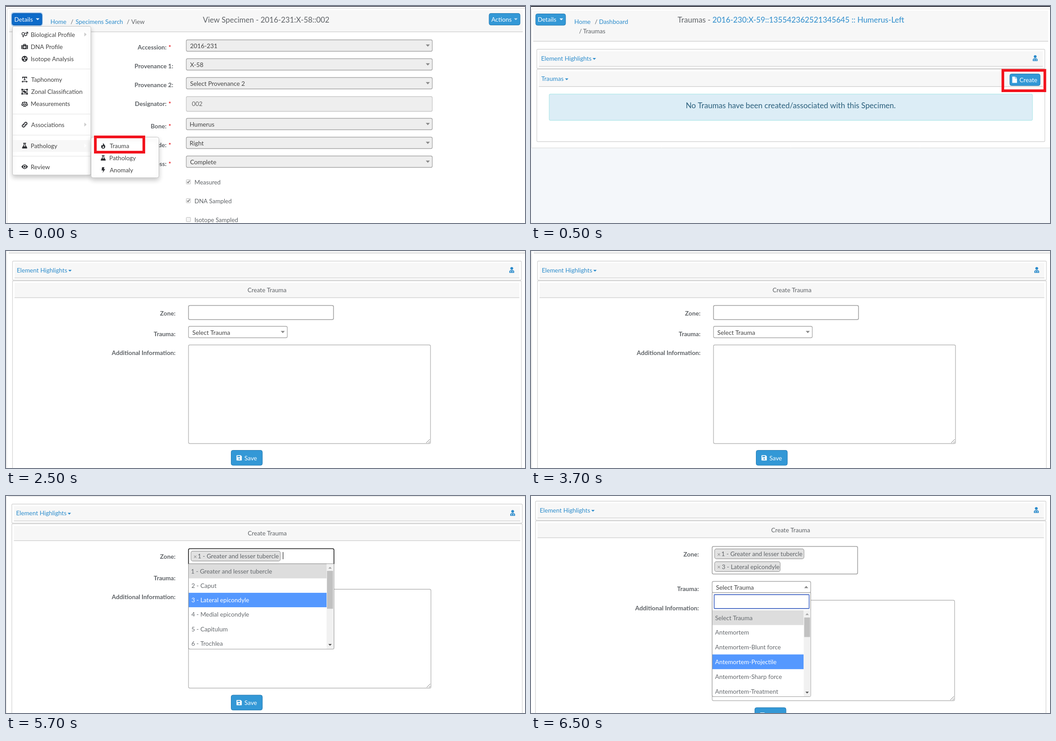
Write an HTML page with a canvas that moves like this. It is 1156 px wide and 484 px high and loops after 8 s.

```html
<!DOCTYPE html>
<html lang="en">
<head>
<meta charset="utf-8">
<title>Specimen trauma walkthrough</title>
<style>
html, body { margin: 0; width: 100%; height: 100%; overflow: hidden; background: #fff; }
canvas { display: block; width: 1156px; height: 484px; }
</style>
</head>
<body>
<canvas id="stage" width="1156" height="484"></canvas>
<script>
const ctx = document.getElementById('stage').getContext('2d');
const W = 1156, H = 484;
const LINK = '#2c8ccc', BTN = '#3398d6', BTN_EDGE = '#2579b0', GREY = '#5f6367', INK = '#444',
      LINE = '#d3d3d3', HEAD = '#f7f7f7', RED = '#f2131d', PICK = '#5498ff';

const ring = (x, y, r) =>
  `M${x - r} ${y}a${r} ${r} 0 1 0 ${2 * r} 0a${r} ${r} 0 1 0 ${-2 * r} 0z`;

// Icons on a 16 unit square: [filled path, stroked path]
const ICONS = {
  gender: ['', ring(4.5, 6.2, 3.2) + ring(10.4, 7.6, 3.2) + 'M4.5 9.4v5.4M2.4 12.4h4.2M12.8 5.3L15.6 2.4M12.2 2.2h3.6v3.6'],
  kit: ['M2 4h12q2 0 2 1.6v6.8q0 1.6-2 1.6H2q-2 0-2-1.6V5.6Q0 4 2 4zM2.6 4h.9v10h-.9zM12.5 4h.9v10h-.9z' +
    'M7 6h2v2h2v2H9v2H7v-2H5V8h2zM4.6 4V2.5q0-1 1-1h4.8q1 0 1 1V4H10V3H6v1z'],
  atom: [ring(8, 8, 7.2) + ring(8, 8, 1.1) + 'M6 8H3a5 5 0 0 1 2.5-4.33L7 6.27zM10 8h3a5 5 0 0 0-2.5-4.33L9 6.27z' +
    'M9 9.73l1.5 2.6a5 5 0 0 1-5 0L7 9.73z'],
  width: ['M2 1h12v4h-1.6L12 3H9v5h1.5v1.3h-5V8H7V3H4l-.4 2H2zM4 10.2v1.7h8v-1.7l3.6 2.7-3.6 2.6v-1.8H4v1.8L.4 12.9z'],
  group: ['M0 1h4v3.6H0zM12 1h4v3.6h-4zM0 11.4h4V15H0zM12 11.4h4V15h-4zM4 5h5v2h3v4.5H7V9.5H4z', 'M2 2.6h12v10.8H2z'],
  scale: ['M0 10h6.4a3.2 2.6 0 0 1-6.4 0zM9.6 10H16a3.2 2.6 0 0 1-6.4 0z',
    'M8 2v12M4 14.4h8M2.6 4h10.8M3.2 4.2L.8 10M3.2 4.2L5.6 10M12.8 4.2L10.4 10M12.8 4.2L15.2 10'],
  link: ['', 'M6.6 9.4a3 3 0 0 1 0-4.2l2.4-2.4a3 3 0 0 1 4.2 4.2l-1.6 1.6M9.4 6.6a3 3 0 0 1 0 4.2l-2.4 2.4a3 3 0 0 1-4.2-4.2l1.6-1.6'],
  flask: ['M4.6 1h6.8v1.8h-1v3.4l3.8 6.3q.9 2.2-1.2 2.2H3q-2.1 0-1.2-2.2l3.8-6.3V2.8h-1zM7.3 2.8h1.4v3.8l1.6 2.7H5.7l1.6-2.7z'],
  eye: ['M0 8Q8-3 16 8 8 19 0 8z' + ring(8, 8, 3.7) + ring(8, 8, 2.3)],
  fire: ['M8 .6C8.6 4 13.2 6 13.2 10.2a5.2 5.2 0 0 1-10.4 0C2.8 8 4 7 4.6 5.4c.4 1.6 1.2 1.8 2 1.8C8 5 7 3 8 .6z' +
    'M8.4 8.6c2.2 2 2.4 4.8-.2 5-2.6 0-2.4-2.8.2-5z'],
  bolt: ['M5 .8h6L9.6 5.6H13L6.4 15.6 8 9H4z'],
  doctor: [ring(8, 4, 3.7) + 'M1.6 15v-2.4Q1.6 8.8 5.4 8.8h5.2q3.8 0 3.8 3.8V15q0 .7-.8.7H2.4q-.8 0-.8-.7z' +
    ring(5.4, 12.5, 1.4) + ring(10.6, 12.5, 1.4)],
  file: ['M2 0h7v4.5h5V16H2zM10 0l4 3.6h-4z'],
  disk: ['M1 2.2Q1 1 2.2 1H12l3 3v9.8q0 1.2-1.2 1.2H2.2Q1 15 1 13.8zM3.4 3h7.2v3.4H3.4z' + ring(8, 10.8, 2)]
};

function icon(name, cx, cy, size, color) {
  const [fill, line] = ICONS[name];
  ctx.save();
  ctx.translate(cx - size / 2, cy - size / 2);
  ctx.scale(size / 16, size / 16);
  ctx.fillStyle = ctx.strokeStyle = color;
  ctx.lineWidth = name === 'link' ? 2.1 : 1.5;
  if (fill) ctx.fill(new Path2D(fill), 'evenodd');
  if (line) ctx.stroke(new Path2D(line));
  ctx.restore();
}

// Places the visible edge of the text at x, with the capitals centred on y
function text(str, x, y, color = GREY, size = 13.6, align = 'left', weight = 400) {
  ctx.font = `${weight} ${size}px Lato, "Open Sans", sans-serif`;
  ctx.fillStyle = color;
  const m = ctx.measureText(str);
  const l = -m.actualBoundingBoxLeft, r = m.actualBoundingBoxRight;
  const dx = align === 'left' ? l : align === 'right' ? r : (l + r) / 2;
  ctx.fillText(str, x - dx, y + size * 0.36);
}

const label = (str, x, y) => text(str, x, y, GREY, 13.7, 'right', 700);

function rect(x, y, r, b, color) {
  ctx.fillStyle = color;
  ctx.fillRect(x, y, r - x, b - y);
}

function box(x, y, r, b, fill, edge, radius = 3, lw = 1) {
  ctx.beginPath();
  ctx.roundRect(x + .5, y + .5, r - x - 1, b - y - 1, radius);
  if (fill) { ctx.fillStyle = fill; ctx.fill(); }
  ctx.strokeStyle = edge;
  ctx.lineWidth = lw;
  ctx.stroke();
}

function tri(cx, cy, w, h, color) {
  ctx.fillStyle = color;
  ctx.beginPath();
  ctx.moveTo(cx - w / 2, cy - h / 2);
  ctx.lineTo(cx + w / 2, cy - h / 2);
  ctx.lineTo(cx, cy + h / 2);
  ctx.fill();
}

function marker(x, y, r, b) {
  ctx.strokeStyle = RED;
  ctx.lineWidth = 6;
  ctx.strokeRect(x + 3, y + 3, r - x - 6, b - y - 6);
}

function shadowed(draw) {
  ctx.save();
  ctx.shadowColor = 'rgba(0,0,0,.22)';
  ctx.shadowBlur = 11;
  ctx.shadowOffsetY = 5;
  draw();
  ctx.restore();
}

function select(x, y, r, b, str, fill = '#fff', up = false) {
  box(x, y, r, b, fill, '#a4a4a4', 3, 1.3);
  text(str, x + 9, (y + b) / 2 + 1.2, INK, 13.75);
  tri(r - 10.5, (y + b) / 2, 9, up ? -5 : 5, '#888');
}

function barHead(x, y, r, b) {
  rect(x, y, r, b, HEAD);
  rect(x, b, r, b + 1.2, '#c8c8c8');
}

function specimenView() {
  rect(0, 0, W, 1.5, '#2b2d38');
  box(2, 5, 1158, 600, '#fff', '#d8d8d8');
  barHead(7, 9, 1151, 57);

  text('Home', 100, 35, LINK, 13.4);
  text('/', 144, 35, GREY, 13.4);
  text('Specimens Search', 155, 35, LINK, 13.4);
  text('/', 269, 35, GREY, 13.4);
  text('View', 279, 35, GREY, 13.4);
  text('View Specimen - 2016-231:X-58::002', 579, 30.5, GREY, 16.9, 'center');

  box(11, 14, 82, 45, '#a9cdf0', '#a9cdf0', 5);
  box(13, 16, 80.5, 43, '#0d6bc9', '#0a55a5', 4);
  text('Details', 19.5, 30, '#fff', 13.6);
  tri(70.5, 29.5, 8, 4, '#fff');
  box(1075.5, 16, 1145.5, 43, BTN, BTN_EDGE, 4);
  text('Actions', 1081, 30, '#fff', 13.7);
  tri(1135.5, 29.5, 8, 4, '#c6e2f4');

  const fields = [
    ['Accession:', 92, 75, '2016-231', 1], ['Provenance 1:', 134, 117, 'X-58', 0],
    ['Provenance 2:', 176.5, 159, 'Select Provenance 2', 0], ['Bone:', 268, 250, 'Humerus', 1],
    ['Side:', 310, 292, 'Right', 1], ['Completeness:', 352, 334, 'Complete', 1]
  ];
  const named = (str, y, need) => {
    label(str, need ? 357 : 372, y);
    if (need) text('*', 362, y, '#e8161e', 13.5, 'left', 700);
  };
  for (const [name, y, top, value, need] of fields) {
    named(name, y, need);
    select(401, top, 950, top + 26.5, value, '#eee');
  }
  named('Designator:', 218, 1);
  box(401, 201.5, 950, 235.5, '#eee', '#c6c6c6', 3, 1.3);
  text('002', 414, 218.5, '#666');

  ['Measured', 'DNA Sampled', 'Isotope Sampled'].forEach((name, i) => {
    const y = 387 + i * 42;
    box(401, y, 411.5, y + 10.5, '#f5f5f5', '#bbb', 1);
    if (i < 2) {
      ctx.strokeStyle = '#777';
      ctx.lineWidth = 1.7;
      ctx.stroke(new Path2D(`M403.5 ${y + 5.2}l2 2.3 3.7-5`));
    }
    text(name, 420.7, y + 6.5, GREY, 13.4);
  });

  shadowed(() => box(14, 45, 189.5, 377.5, '#fff', '#c4c4c4', 3));
  rect(15, 299, 189, 325.5, HEAD);
  for (const y of [140, 240.5, 287.5, 334.5]) rect(15, y, 189, y + 1, '#e2e2e2');
  const items = [
    ['Biological Profile', 'gender', 64], ['DNA Profile', 'kit', 91], ['Isotope Analysis', 'atom', 118],
    ['Taphonomy', 'width', 164.5], ['Zonal Classification', 'group', 191.5], ['Measurements', 'scale', 218.5],
    ['Associations', 'link', 265], ['Pathology', 'flask', 312], ['Review', 'eye', 358.7]
  ];
  for (const [name, pic, y] of items) {
    icon(pic, 41.5, y - .3, 14.5, '#2b2d31');
    text(name, 56, y, INK, 13.5);
  }
  [[64, '#ccc'], [265, '#ccc'], [312, '#fff']].forEach(([y, color]) => {
    ctx.fillStyle = color;
    ctx.fill(new Path2D(`M174.5 ${y - 5}l5 4.5-5 4.5z`));
  });

  shadowed(() => box(189, 292, 341, 383.5, '#fff', '#c4c4c4', 4));
  [['Trauma', 'fire'], ['Pathology', 'flask'], ['Anomaly', 'bolt']].forEach(([name, pic], i) => {
    icon(pic, 216.5, 311.8 + i * 27, 14, '#2b2d31');
    text(name, 231, 312 + i * 27, INK, 13.5);
  });
  marker(196, 289, 310, 329);
}

function card(x, y, r, b, head) {
  box(x, y, r, b, '#fff', LINE, 2, 1.3);
  barHead(x + 5, y + 5, r - 5, head);
}

function highlights(x, y, r, b) {
  card(x, y, r, b, b - 6);
  const mid = y + 20.8;
  text('Element Highlights', x + 11, mid, LINK);
  tri(x + 128.5, mid + 1.3, 7.5, 4, LINK);
  icon('doctor', r - 22, mid - .5, 13.5, LINK);
}

function traumaList() {
  rect(0, 316, W, H, '#f4f7fa');
  box(0, 6, 1157, 317, '#fff', '#d8d8d8', 2);
  rect(0, 0, W, 2, '#2b2d38');
  barHead(5, 10, 1152, 78);
  box(10, 17, 77.5, 43.5, BTN, BTN_EDGE, 4);
  text('Details', 16, 30.3, '#fff', 13.6);
  tri(67.5, 29.8, 8, 4, '#fff');
  text('Home', 97.5, 35.5, LINK);
  text('/', 142, 35.5);
  text('Dashboard', 152.5, 35.5, LINK);
  text('/', 107, 56.5);
  text('Traumas', 116, 56.5);
  text('Traumas -', 326.5, 31, GREY, 17.2);
  text('2016-230:X-59::135542362521345645 :: Humerus-Left', 404, 31, LINK, 17.2);

  highlights(12.5, 96, 1145, 140);
  card(12.5, 140.5, 1145, 303, 179);
  text('Traumas', 23, 162.5, LINK);
  tri(79.5, 163.5, 7.5, 4, LINK);
  box(1066, 151, 1134.5, 178, BTN, BTN_EDGE, 4);
  icon('file', 1077.2, 164.5, 14, '#fff');
  text('Create', 1088, 165, '#fff', 13.7);
  marker(1048, 140.5, 1147.5, 192);

  box(40, 196, 1117.5, 255.5, '#dcedf6', '#b6e9ea', 3, 1.3);
  text('No Traumas have been created/associated with this Specimen.', 579, 221.5, '#2a5f7c', 17.15, 'center');
}

function grip(r, b) {
  ctx.strokeStyle = '#777';
  ctx.lineWidth = 1;
  ctx.stroke(new Path2D(`M${r - 10} ${b - 2}l8-8M${r - 5} ${b - 2}l3-3`));
}

// o: positions of the create form's parts
function formBase(o) {
  highlights(o.x, o.y, o.r, o.y + 43.5);
  card(o.x, o.y + 44, o.r, 520, o.y + 81.5);
  text('Create Trauma', o.mid, o.y + 65.5, GREY, 13.6, 'center');
  label('Zone:', o.label, o.zone);
  label('Trauma:', o.label, o.trauma);
  label('Additional Information:', o.label, o.info);
  const [x, y, r, b] = o.area;
  box(x, y, r, b, '#fff', '#b4b4b4', 3, 1.4);
  grip(r, b);
  const s = o.save, bx = x + 95;
  box(bx, s, bx + 70.5, s + 34.5, BTN, BTN_EDGE, 4);
  icon('disk', bx + 18.3, s + 17.4, 13.5, '#fff');
  text('Save', bx + 30, s + 17.7, '#fff', 13.7);
}

function tag(x, y, r, str) {
  box(x, y, r, y + 23, '#e2e2e2', '#a4a4a4', 4, 1.3);
  text('×', x + 6, y + 12.2, '#8a8a8a', 13.6);
  text(str, x + 16.5, y + 11.8);
}

function options(x, r, top, step, names, bottom) {
  ctx.save();
  ctx.beginPath();
  ctx.rect(x, top, r - x, bottom - top);
  ctx.clip();
  names.forEach((name, i) => {
    const y = top + i * step, on = names.picked === i;
    if (!i || on) rect(x, y, r, y + step, on ? PICK : '#ddd');
    text(name, x + 6, y + step / 2 + .4, on ? '#fff' : '#666a6e');
  });
  ctx.restore();
}

function scrollbar(x, r, top, bottom, from, to) {
  const mid = (x + r) / 2;
  rect(x, top, r, bottom, '#f1f1f1');
  rect(x + 1, from, r - 1, to, '#c1c1c1');
  tri(mid, top + 8.5, 7.5, -4, '#a3a3a3');
  tri(mid, bottom - 8.5, 7.5, 4, '#505050');
}

const GREATER = '1 - Greater and lesser tubercle', LATERAL = '3 - Lateral epicondyle';
const zones = [GREATER, '2 - Caput', LATERAL, '4 - Medial epicondyle', '5 - Capitulum', '6 - Trochlea'];
zones.picked = 2;
const kinds = ['Select Trauma', 'Antemortem', ...['Blunt force', 'Projectile', 'Sharp force', 'Treatment'].map(k => 'Antemortem-' + k)];
kinds.picked = 3;

function emptyForm() {
  rect(1, 0, 2, H, '#d8d8d8');
  barHead(6, 0, W, 4);
  formBase({ x: 14, y: 22, r: 1148.5, mid: 581, label: 377, zone: 139, trauma: 185.5, info: 227,
    area: [406, 209, 946, 430], save: 444 });
  box(406, 121, 730, 153.5, '#fff', '#9a9a9a', 3, 1.5);
  select(406, 167.5, 627, 194, 'Select Trauma');
}

function zoneForm() {
  rect(0, 0, 1, H, '#dcdcdc');
  rect(5, 0, W, 1, '#d4d4d4');
  formBase({ x: 12.5, y: 17.5, r: 1150.5, mid: 581.5, label: 377, zone: 135, trauma: 183.5, info: 225.5,
    area: [406, 207.5, 947, 429], save: 443.5 });
  box(406, 117, 731, 152, '#fff', '#111', [3, 3, 0, 0], 1.6);
  tag(411.5, 122.5, 611.5, GREATER);
  rect(616.5, 125, 617.7, 141, '#222');
  box(406, 151, 731, 342, '#fff', '#999', [0, 0, 3, 3], 1.2);
  options(407, 714, 151.5, 32.2, zones, 340.5);
  scrollbar(714, 729.5, 151.5, 340.5, 167, 251.5);
}

function traumaForm() {
  formBase({ x: 9.5, y: 11, r: 1147.5, mid: 578, label: 373.5, zone: 130, trauma: 207, info: 250,
    area: [403, 232, 944, 457], save: 471.5 });
  box(403, 112, 728, 174.5, '#fff', '#9a9a9a', 3, 1.5);
  tag(408.5, 117.5, 608.5, GREATER);
  tag(408.5, 146, 555.5, LATERAL);
  box(403, 215, 623.5, 448, '#fff', '#999', [0, 0, 3, 3], 1.2);
  select(403, 190, 623.5, 216, 'Select Trauma', '#fff', true);
  box(407.5, 219.5, 620, 251.5, '#fff', '#5373c8', 1, 1.8);
  options(404, 607.5, 255, 32.8, kinds, 447);
  scrollbar(607.5, 622.5, 255, 447, 271, 314.5);
}

const scenes = [[500, specimenView], [2500, traumaList], [4500, emptyForm], [6500, zoneForm], [8000, traumaForm]];
const start = performance.now();

function frame(now) {
  const t = Math.max(0, now - start) % 8000;
  rect(0, 0, W, H, '#fff');
  scenes.find(([end]) => t < end)[1]();
  requestAnimationFrame(frame);
}
frame(start);
</script>
</body>
</html>
```
